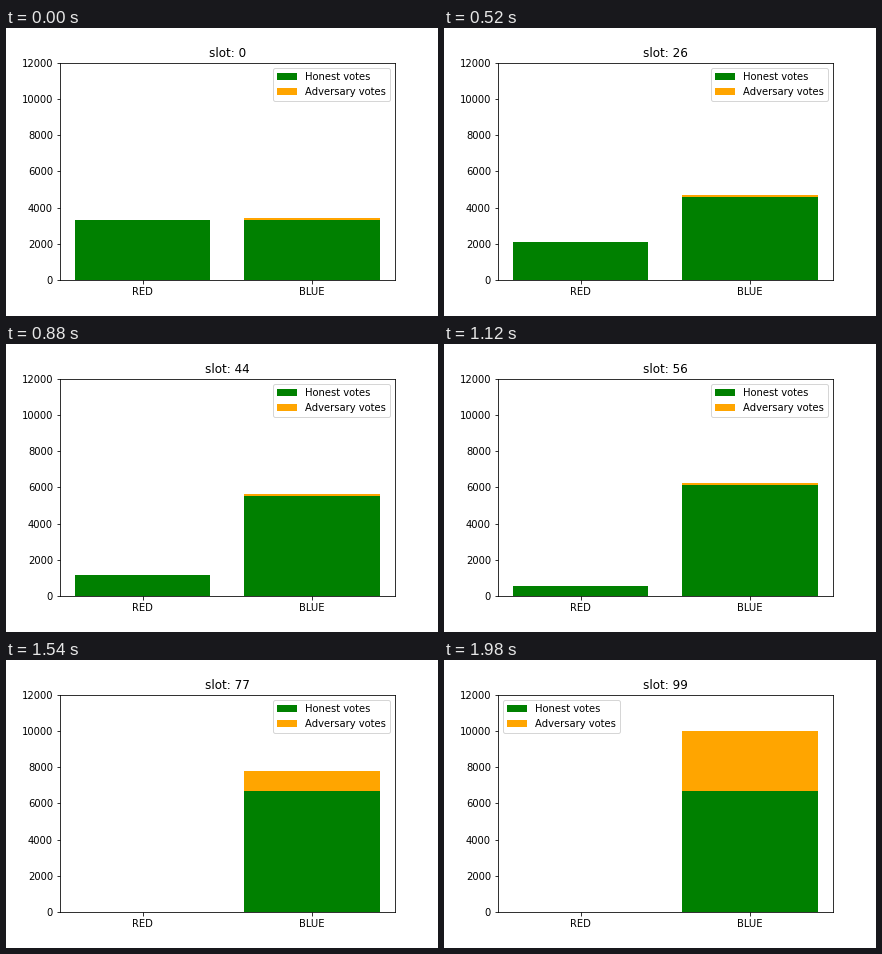
A matplotlib script for the animation above (2000 ms loop, 432 by 288 pixels).

```python
import numpy as np
import matplotlib.pyplot as plt
from matplotlib.animation import FuncAnimation

SLOTS = 100
HONEST = 6667

fig, ax = plt.subplots(figsize=(6, 4), dpi=72)
fig.subplots_adjust(left=0.125, right=0.9, bottom=0.125, top=0.88)

honest = ax.bar(["RED", "BLUE"], [3333, 3334], color="green", label="Honest votes")
adversary = ax.bar(["BLUE"], [100], bottom=[3334], color="orange", label="Adversary votes")
ax.set_ylim(0, 12000)
ax.legend(loc="best")
title = ax.set_title("slot: 0")


def votes(slot):
    """Honest votes for each side, then the adversary's votes for BLUE."""
    red = np.clip(3408 - 51.4 * slot, 0, 3333)
    extra = max(100, 100 * (slot + 1) - HONEST)
    return red, HONEST - red, extra


def update(slot):
    red, blue, extra = votes(slot)
    honest[0].set_height(red)
    honest[1].set_height(blue)
    adversary[0].set_y(blue)
    adversary[0].set_height(extra)
    title.set_text(f"slot: {slot}")
    return [*honest, *adversary, title]


anim = FuncAnimation(fig, update, frames=SLOTS, interval=20, repeat=True, repeat_delay=0)
plt.show()
```
